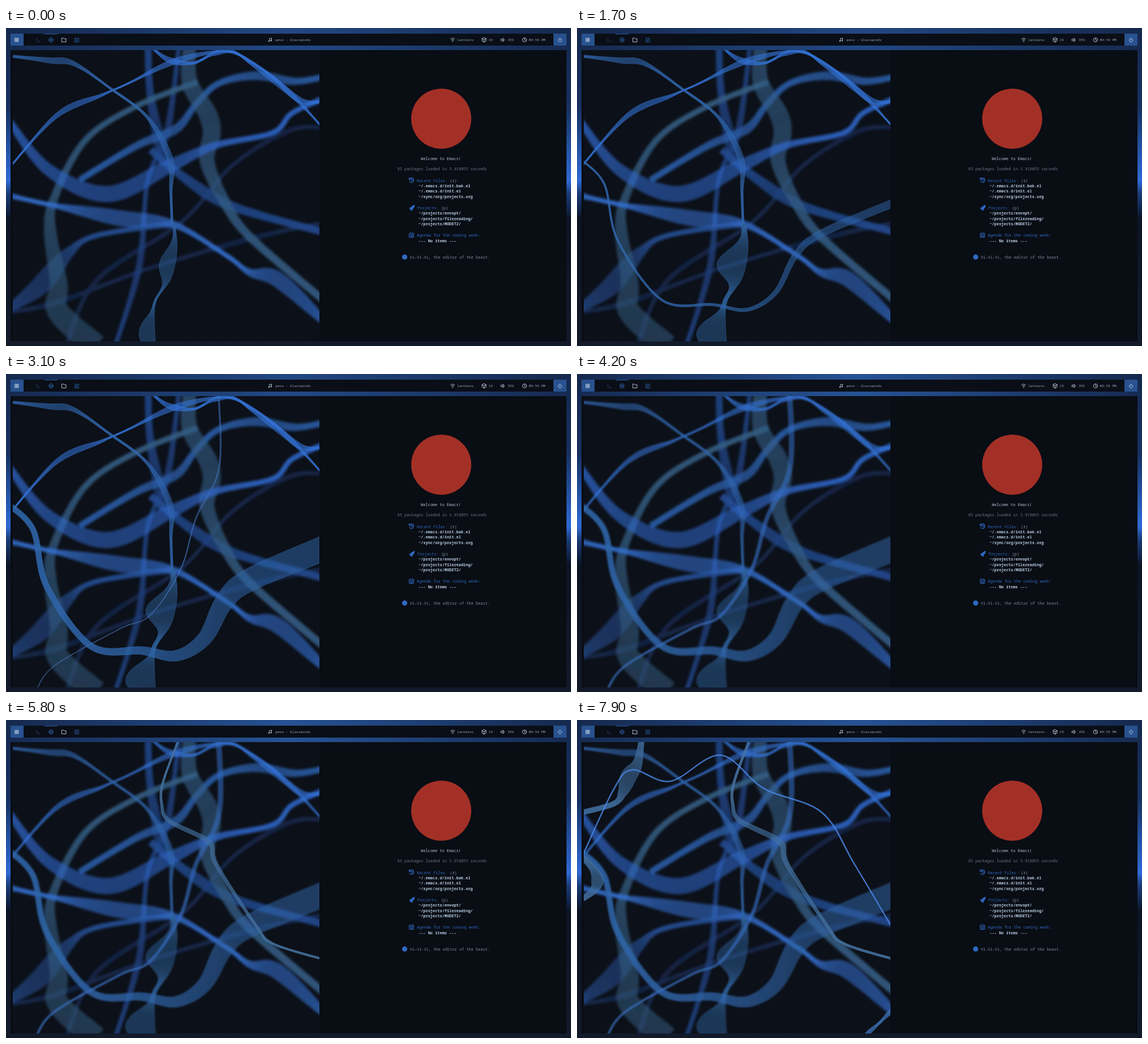
An HTML page that plays this animation: 997 by 561 pixels, repeating every 8 s.

```html
<!DOCTYPE html>
<html lang="en">
<head>
<meta charset="utf-8">
<title>Desktop with growing ribbons</title>
<style>
html, body { margin: 0; width: 100%; height: 100%; overflow: hidden; background: #0e1524; }
svg { display: block; width: 100vw; height: 100vh; }
text { font-family: "Noto Sans Mono", "DejaVu Sans Mono", monospace; font-size: 6.95px; white-space: pre; }
.bar text { font-size: 6.1px; fill: #9aa8ba; }
.icon { fill: none; stroke-width: .9; stroke-linejoin: round; stroke-linecap: round; }
.head { fill: #2f69c2; }
.key { fill: #8897a9; }
.item { fill: #b4c8de; font-weight: 700; }
</style>
</head>
<body>
<svg viewBox="0 0 997 561" preserveAspectRatio="none">
  <defs id="defs">
    <linearGradient id="sky" x1="0" y1="0" x2="0" y2="1">
      <stop offset="0" stop-color="#15284c"/>
      <stop offset=".25" stop-color="#17315f"/>
      <stop offset=".37" stop-color="#2450a0"/>
      <stop offset=".48" stop-color="#2f6ad4"/>
      <stop offset=".52" stop-color="#1b3c78"/>
      <stop offset=".58" stop-color="#10203f"/>
      <stop offset=".6" stop-color="#0d1424"/>
      <stop offset="1" stop-color="#131b2b"/>
    </linearGradient>
    <linearGradient id="glow">
      <stop offset="0" stop-color="#2c60ac" stop-opacity="0"/>
      <stop offset=".5" stop-color="#2c60ac" stop-opacity=".75"/>
      <stop offset="1" stop-color="#2c60ac" stop-opacity="0"/>
    </linearGradient>
    <clipPath id="pane"><rect x="12" y="39" width="541" height="514"/></clipPath>
    <filter id="farBlur" filterUnits="userSpaceOnUse" x="-20" y="0" width="620" height="600"><feGaussianBlur stdDeviation="2.2"/></filter>
    <filter id="midBlur" filterUnits="userSpaceOnUse" x="-20" y="0" width="620" height="600"><feGaussianBlur stdDeviation="1.7"/></filter>
  </defs>

  <rect width="997" height="561" fill="url(#sky)"/>
  <rect id="shine" width="997" height="39" fill="url(#glow)"/>
  <rect x="8" y="39" width="981" height="514" fill="#090d14"/>
  <rect x="12" y="39" width="541" height="514" fill="#0c1018"/>
  <g clip-path="url(#pane)">
    <g id="far" filter="url(#farBlur)"></g>
    <g id="mid"></g>
    <g id="near"></g>
  </g>

  <g class="bar">
    <rect x="8" y="10" width="981" height="21" fill="#0a0e16"/>
    <rect x="8" y="10" width="23" height="21" fill="#28528f"/>
    <rect x="966" y="10" width="23" height="21" fill="#28528f"/>
    <rect x="68" y="10" width="23" height="1.2" fill="#28528f"/>
    <g class="icon" stroke="#c3d2e6">
      <path d="M16 18h2.3v2.3H16zM19.7 18H22v2.3h-2.3zM16 21.7h2.3V24H16zM19.7 21.7H22V24h-2.3z"/>
      <path d="M98.700 17.800h2.800l1 1.200h3.500v5.600h-7.300z"/>
      <path d="M784.800 19.300q3.400-3 6.800 0M786 21.200q2.200-2 4.400 0M787.300 23q.9-.8 1.800 0M788.200 24.300v.1"/>
      <path d="M843.700 17l3.500 1.900v4.100l-3.500 2-3.500-2v-4.100zM840.200 18.900l3.500 2 3.500-2M843.700 20.900V25"/>
      <path d="M873.700 19.800h1.500l2-1.800v6l-2-1.800h-1.500zM878.800 19.500q1.200 1.500 0 3"/>
      <circle cx="915" cy="21" r="3.600"/><path d="M915 18.700V21l1.600 1"/>
      <path d="M975.800 19a3 3 0 1 0 3.600 0M977.600 17.500v3.200"/>
    </g>
    <g class="icon" stroke="#2b5797">
      <path d="M53.500 18.500l2 2-2 2M56.500 23.800h3.200"/>
      <circle cx="79.400" cy="21" r="3.800"/><ellipse cx="79.400" cy="21" rx="1.700" ry="3.800"/><path d="M75.600 21h7.600"/>
      <path stroke="#3069b8" d="M125 17.900h-3.300v6.700h6.500v-3.200M124 22.200l.4-1.700 3.300-3.300 1.300 1.200-3.300 3.300z"/>
    </g>
    <path d="M464.800 23v-4.300l3.700-.8v4.200" class="icon" stroke="#c3d2e6"/>
    <circle cx="464" cy="23.200" r="1.100" fill="#c3d2e6"/><circle cx="467.700" cy="22.300" r="1.100" fill="#c3d2e6"/>
    <text x="475.500" y="23.200">pevo - Glasswinds</text>
    <text x="796" y="23.200">lanterns</text>
    <text x="851.500" y="23.200">19</text>
    <text x="885.200" y="23.200">35%</text>
    <text x="922.500" y="23.200">09:59 PM</text>
  </g>

  <circle cx="768" cy="160" r="53" fill="#a33026"/>
  <text x="732" y="232.600" fill="#b3c1d3">Welcome to Emacs!</text>
  <text x="690.500" y="251.400" fill="#697688">85 packages loaded in 3.918055 seconds</text>

  <g class="icon" stroke="#2f69c2">
    <path stroke-width="1.300" d="M712 266.500a4 4 0 1 1 .2 4M711.500 264.500v2.700h2.800M715.800 266.200v2.500h2"/>
    <path fill="#2f69c2" stroke-width=".5" d="M721 312.500q-4 0-6.500 4l-2 .4-1 1.800 2.200.2-.6 2 2-.6.400 2.200 1.700-1 .4-2.300q3.600-2.700 3.400-6.700z"/>
    <path d="M711.800 362.200h7.600v7.300h-7.600zM711.800 364.500h7.600M713.700 361v1.300M717.500 361v1.300M713.500 366.500h4.300M713.500 368h4.300"/>
  </g>
  <circle cx="703.500" cy="404" r="4.600" fill="#2f69c2"/>

  <text class="head" x="725" y="271.500">Recent Files: <tspan class="key">(r)</tspan></text>
  <text class="item" x="728" y="281">~/.emacs.d/init.bak.el</text>
  <text class="item" x="728" y="290.400">~/.emacs.d/init.el</text>
  <text class="item" x="728" y="299.800">~/sync/org/projects.org</text>
  <text class="head" x="726" y="319.800">Projects: <tspan class="key">(p)</tspan></text>
  <text class="item" x="728" y="329.200">~/projects/envopt/</text>
  <text class="item" x="728" y="338.600">~/projects/filereading/</text>
  <text class="item" x="728" y="348">~/projects/MODET2/</text>
  <text class="head" x="725" y="368.200">Agenda for the coming week:</text>
  <text class="item" x="728" y="377.600">--- No items ---</text>
  <text x="712.500" y="407" fill="#7e8b9c">Vi-Vi-Vi, the editor of the beast.</text>
</svg>

<script>
const LOOP = 8000, BLUR_AT = 4200, STEPS = 12;
const $ = id => document.getElementById(id);
const clamp = v => Math.max(0, Math.min(1, v));
const growing = [];

function add(parent, tag, attrs) {
  const el = document.createElementNS("http://www.w3.org/2000/svg", tag);
  for (const k in attrs) el.setAttribute(k, attrs[k]);
  return parent.appendChild(el);
}

const spline = (a, b, c, d, u) =>
  b + u * (c - a + u * (2 * a - 5 * b + 4 * c - d + u * (3 * (b - c) + d - a))) / 2;

// Push ends that touch the pane's edge a little past it.
function overshoot([x, y], [qx, qy]) {
  if (x > 12 && x < 553 && y > 40 && y < 553) return [x, y];
  const k = 12 / Math.hypot(x - qx, y - qy);
  return [x + (x - qx) * k, y + (y - qy) * k];
}

// A smooth line through the key points whose width swells and narrows as the band twists.
function strand(text, { lo, hi, turns, phase }) {
  const keys = text.split(" ").map(p => p.split(",").map(Number));
  const end = keys.length - 1;
  const first = overshoot(keys[0], keys[1]);
  keys[end] = overshoot(keys[end], keys[end - 1]);
  keys[0] = first;
  const key = i => keys[Math.max(0, Math.min(end, i))];
  return Array.from({ length: end * STEPS + 1 }, (_, n) => {
    const i = Math.floor(n / STEPS), f = n / STEPS - i, u = n / (end * STEPS);
    const axis = k => spline(key(i - 1)[k], key(i)[k], key(i + 1)[k], key(i + 2)[k], f);
    const w = lo + (hi - lo) * Math.sin(Math.PI * (turns * u + phase)) ** 4;
    return { x: axis(0), y: axis(1), w };
  });
}

// Bands widen about their middle, or only leftwards when "sweep" is set.
function outline({ pts, sweep }, grow) {
  const a = [], b = [];
  pts.forEach(({ x, y, w }, i) => {
    const p = pts[Math.max(0, i - 1)], q = pts[Math.min(pts.length - 1, i + 1)];
    const len = Math.hypot(q.x - p.x, q.y - p.y) || 1;
    const wide = Math.max(.5, w * grow);
    const nx = sweep ? -wide : (p.y - q.y) / len * wide / 2;
    const ny = sweep ? 0 : (q.x - p.x) / len * wide / 2;
    const back = sweep ? 0 : 1;
    a.push((x + nx).toFixed(1) + " " + (y + ny).toFixed(1));
    b.unshift((x - nx * back).toFixed(1) + " " + (y - ny * back).toFixed(1));
  });
  return "M" + a.concat(b).join("L") + "Z";
}

// The wider the band spreads, the fainter it gets.
function shade(pts, color, lo) {
  const p = pts[0], q = pts[pts.length - 1];
  const dx = q.x - p.x, dy = q.y - p.y;
  const id = "shade" + $("defs").children.length;
  const grad = add($("defs"), "linearGradient",
    { id, gradientUnits: "userSpaceOnUse", x1: p.x, y1: p.y, x2: q.x, y2: q.y });
  for (let i = 0; i < pts.length; i += 4) {
    const { x, y, w } = pts[i];
    add(grad, "stop", {
      offset: clamp(((x - p.x) * dx + (y - p.y) * dy) / (dx * dx + dy * dy)),
      "stop-color": color, "stop-opacity": .4 + .5 * lo / w
    });
  }
  return `url(#${id})`;
}

function ribbon(layer, color, keys, lo, hi, opt = {}) {
  const pts = strand(keys, { lo, hi, turns: 2, phase: 0, ...opt });
  const band = { pts, ...opt };
  band.el = add($(layer), "path", { fill: shade(pts, color, lo), d: outline(band, 1) });
  if (opt.line) {
    band.el.setAttribute("stroke", opt.line);
    band.el.setAttribute("stroke-width", .5);
    band.el.setAttribute("stroke-opacity", .65);
  }
  if (opt.to) growing.push(band);
}

// dim strands at the back
ribbon("far", "#15294f", "12,500 90,484 250,425 430,372 553,345", 7, 10);
ribbon("far", "#15284d", "553,177 500,181 400,242 310,342 160,445 110,553", 7, 9);
ribbon("far", "#1f4384", "251,40 253,100 262,160 280,240", 12, 22, { turns: .5 });
ribbon("far", "#1f4180", "304,40 285,180 250,270 235,420 195,553", 8, 12);
ribbon("far", "#224a90", "255,215 320,268 400,315 553,358", 13, 20, { turns: 1 });
ribbon("far", "#264f96", "12,490 60,455 110,397 160,366 292,346", 9, 34, { turns: 1, phase: .2 });

// soft broad bands
ribbon("far", "#2a5ca6", "130,268 230,208 300,178 335,135 375,98 440,84 510,94 553,87", 11, 16);
ribbon("far", "#345d82", "338,95 230,138 140,198 85,300 78,360 93,450 92,500 150,553", 10, 42, { turns: .5 });
ribbon("far", "#345d85", "324,40 324,95 355,150 363,185 355,235 385,305 430,368 553,474", 13, 33, { turns: .6, phase: .3 });
ribbon("far", "#2f66c8", "12,172 75,250 180,293 290,243 370,207 470,185 505,150 553,128", 9, 29, { turns: 1, phase: .2 });
ribbon("far", "#3470d2", "12,297 60,308 110,318 205,336 295,346 390,402 430,431 480,444 553,510", 8, 28, { phase: -.25 });

// middle layer: sharp until it drops out of focus
const BRIGHT = "#4080e4", SOFT = "#3c74bb";
ribbon("mid", "#3070d6", "265,40 287,56 330,62 365,46 400,42 460,78 520,128 553,128", 4, 10, { turns: 3, line: BRIGHT });
ribbon("mid", "#3273d8", "12,240 90,154 170,118 215,98 300,58 390,41 435,65 505,119 553,170", 3, 10, { turns: 3, line: BRIGHT });
ribbon("mid", "#2f64ac", "12,50 75,57 120,63 185,107 250,158 289,230 291,290 293,347", 4, 11, { phase: .1, line: SOFT });
ribbon("mid", "#2d6099", "298,345 302,390 292,440 266,480 262,515 264,553", 8, 52, { turns: 1.67, sweep: true, line: SOFT, from: -1300, to: 1100 });
ribbon("mid", "#2e64a8", "12,238 48,275 72,375 150,480 240,488 300,497 350,467 385,402 430,363 553,311", 10, 46, { turns: .45, line: SOFT, from: 1200, to: 2750 });
ribbon("mid", "#316bc4", "58,553 85,515 200,450 255,425 308,345 335,255 376,165 375,40", 3, 9, { turns: .5, line: "#5c7ba4", from: 2800, to: 3900 });

// newest strands
const PALE = "#4c7fb5";
ribbon("near", "#41709f", "303,40 277,110 275,150 288,178 358,215 371,255 442,364 472,395 553,420", 4, 9, { turns: 1, line: "#668db9", from: 4500, to: 6000 });
ribbon("near", "#3f6d9d", "113,40 107,75 91,100 81,127 64,148 12,162", 9, 28, { turns: 1, phase: .1, line: PALE, from: 5800, to: 6900 });
ribbon("near", "#3f6d9d", "12,245 28,262 36,283 28,302 12,313", 10, 21, { turns: 1, line: PALE, from: 5800, to: 6900 });
ribbon("near", "#4585e4", "12,235 65,122 98,88 165,108 253,62 330,121 432,163 490,255 553,361", 4, 5, { line: "#5189e2", from: 7200, to: 8700 });
ribbon("near", "#3b70b5", "512,553 535,533 553,514", 10, 16, { line: PALE, from: 7200, to: 8700 });

function draw(t) {
  for (const band of growing) {
    const g = clamp((t - band.from) / (band.to - band.from));
    band.el.setAttribute("opacity", clamp((t - band.from) / 250));
    if (g !== band.shown) band.el.setAttribute("d", outline(band, g));
    band.shown = g;
  }
  const soft = t >= BLUR_AT;
  $("mid").setAttribute("filter", soft ? "url(#midBlur)" : "none");
  $("shine").setAttribute("opacity", soft ? 1 : .75);
}

const start = performance.now();
function tick() {
  draw((performance.now() - start) % LOOP);
  requestAnimationFrame(tick);
}
tick();
</script>
</body>
</html>
```
